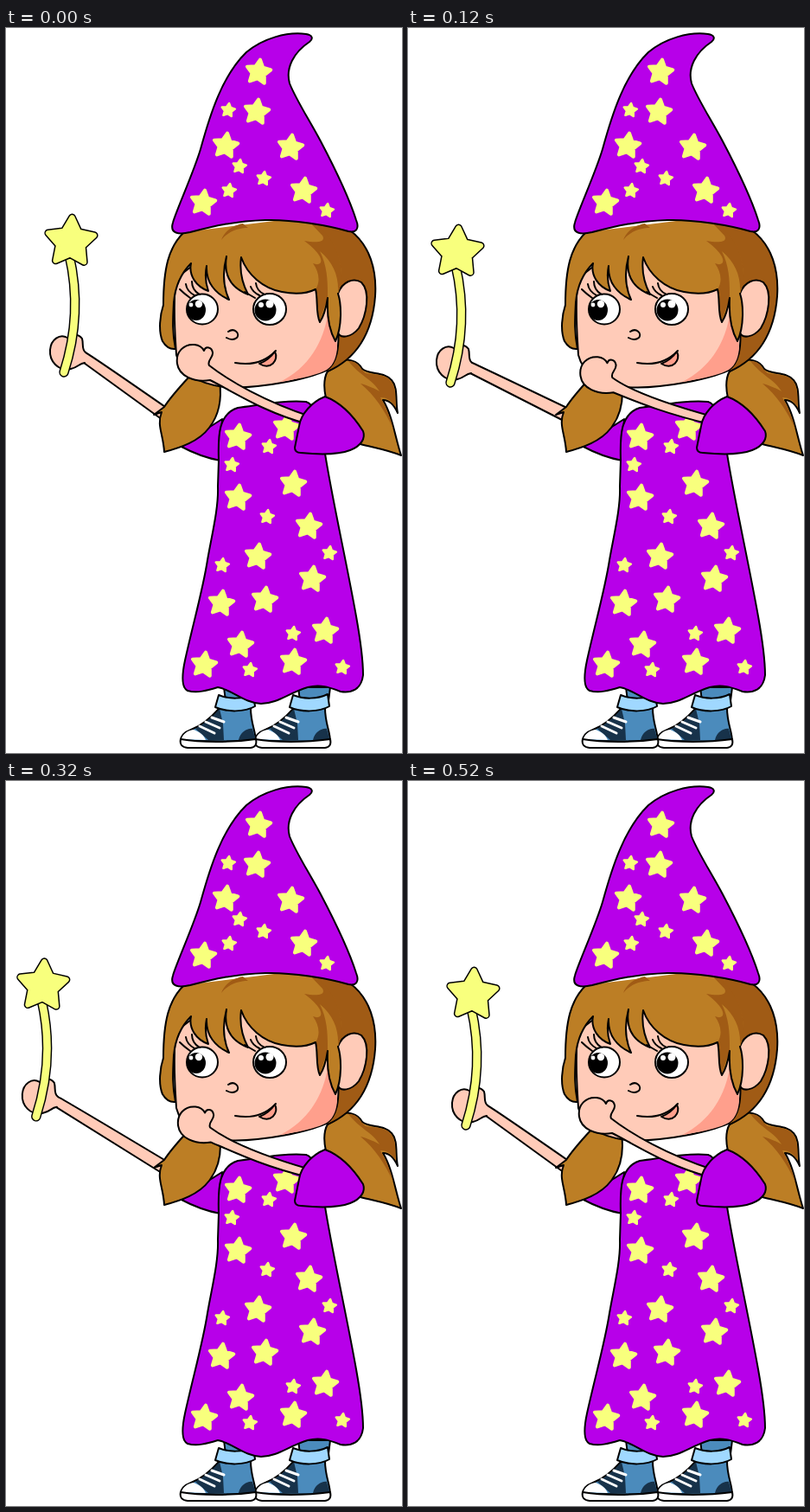
Write an HTML page that moves like this. It is 458x838 px and loops after 0.56 s.

```html
<!DOCTYPE html>
<html lang="en">
<head>
<meta charset="utf-8">
<style>
  html, body { margin: 0; width: 100%; height: 100%; overflow: hidden; background: #fff; }
  svg { display: block; }
  .ink { stroke: #000; stroke-width: 2; stroke-linejoin: round; stroke-linecap: round; }
  .line { fill: none; }
  .purple { fill: #b700e9; }
  .skin { fill: #ffcbb8; }
  .blush { fill: #ff9f8c; }
  .hair { fill: #bc7e25; }
  .shade { fill: #a05b15; }
  .denim { fill: #4b8bbc; }
  .cuff { fill: #a0d8ff; }
  .navy { fill: #17324a; }
  .white { fill: #fff; }
  .yellow { fill: #f8ff7d; stroke: #f8ff7d; stroke-linejoin: round; }
</style>
</head>
<body>
<svg width="458" height="838" viewBox="0 0 458 838">
  <defs>
    <g id="shoe">
      <path class="ink denim" d="M252 762H289L287 778H254Z"/>
      <path class="ink denim" d="M247 786C239 795 228 806 214 811C206 814 202 819 202 824L289 825C289 813 283 804 283 786Z"/>
      <path class="navy" d="M247 787C239 796 231 804 219 810L234 823H252L251 804ZM269 823C271 814 279 809 285 810L289 824Z"/>
      <path class="white" d="M203 822C204 816 210 812 217 811C225 814 229 818 231 823Z"/>
      <path class="line" stroke="#fff" stroke-width="3" stroke-linecap="round" d="M238 797L252 802M231 802L247 809M224 807L241 815"/>
      <path class="ink white" d="M202 822C225 826 260 826 289 822Q291 831 283 832H210Q200 831 202 822Z"/>
      <path class="ink cuff" d="M246 771C258 776 274 776 286 770L288 784C276 791 255 791 242 785Z"/>
    </g>
  </defs>

  <use href="#shoe" x="86"/>
  <use href="#shoe"/>

  <path class="ink purple" d="M250 452L201 483C216 491 230 497 248 500Z"/>
  <path id="farArm" class="ink skin"/>
  <g id="wand">
    <path class="ink skin" d="M91 387C84 388 84 392 75 394C60 397 50 385 51 372C52 360 62 353 71 358C76 354 84 353 88 359C90 366 87 371 92 375"/>
    <path class="line" stroke="#000" stroke-width="11.5" stroke-linecap="round" stroke-linejoin="round" d="M73 262Q89 330 67 398"/>
    <path class="line" stroke="#f8ff7d" stroke-width="8.6" stroke-linecap="round" d="M73 262Q89 330 67 398"/>
  </g>

  <path class="ink purple" d="M246 500C245 470 246 446 268 439C293 436 320 430 347 432Q354 434 358 446L369 492C378 548 394 618 405 680C410 708 413 730 413 748C411 765 399 769 387 767C374 762 363 758 349 762C328 768 314 781 295 781C275 780 262 765 245 762C232 766 221 769 210 766C202 762 204 745 207 731C216 690 228 648 233 615C238 586 246 555 245 530Z"/>
  <path class="ink hair" d="M211 404C200 416 190 427 183 438L171 447L180 444C174 459 182 470 183 490C202 485 223 478 235 462C246 448 250 430 247 408Z"/>
  <path class="ink hair" d="M370 428C366 410 368 394 383 386C394 381 407 384 412 394C421 401 438 397 446 407C454 416 450 431 453 445C449 436 443 430 436 430C447 448 450 473 457 494C439 487 425 485 410 481Z"/>
  <path class="shade" d="M396 385C408 385 409 394 416 399C429 401 440 400 446 409C452 418 449 429 451 439C446 430 440 427 433 427C440 439 445 452 448 464C439 443 426 424 410 411C418 413 427 417 432 420C424 406 409 402 396 385Z"/>

  <path class="ink shade" d="M350 220L398 234C421 251 429 280 427 310C424 349 408 381 372 397L340 340Z"/>
  <path class="ink skin" d="M196 290C193 330 196 360 197 378C202 398 221 411 252 415C294 418 350 405 370 396C383 388 386 370 384 340L372 270L260 240Z"/>
  <path class="blush" d="M372 330C368 362 350 393 317 409C343 405 363 400 371 395C380 389 383 378 383 366L376 335Z"/>
  <path class="ink skin" d="M384 307C389 293 402 288 411 294C422 305 417 332 408 347C400 357 386 361 383 350Z"/>

  <path class="hair" d="M206 236C188 253 182 278 182 320C178 332 176 350 181 362Q187 372 196 371C192 350 193 337 194 317C196 295 204 282 214 272C211 286 220 299 234 304Q229 290 232 275C231 294 242 307 258 314C252 301 250 283 255 264C251 288 262 301 280 308C273 295 270 280 272 265C279 285 297 301 319 305C334 308 348 307 358 302C361 314 358 330 363 340Q369 331 372 312C371 331 374 350 381 362C389 345 388 319 384 307C390 291 391 263 369 240L350 218Z"/>
  <path class="shade" d="M347 220C369 231 390 255 388 293L384 306C385 288 379 271 363 258C373 278 372 299 372 312L363 338C359 328 361 315 358 302C364 293 362 282 355 272C367 277 371 265 345 246C361 249 370 247 366 240ZM249 245C257 235 269 231 280 231L274 226C263 228 253 234 249 245Z"/>
  <path class="ink line" d="M206 236C188 253 182 278 182 320C178 332 176 350 181 362Q187 372 196 371C192 350 193 337 194 317C196 295 204 282 214 272C211 286 220 299 234 304Q229 290 232 275C231 294 242 307 258 314C252 301 250 283 255 264C251 288 262 301 280 308C273 295 270 280 272 265C279 285 297 301 319 305C334 308 348 307 358 302C361 314 358 330 363 340Q369 331 372 312C371 331 374 350 381 362C389 345 388 319 384 307"/>

  <g class="ink white">
    <ellipse cx="227" cy="325" rx="18" ry="17.5"/>
    <ellipse cx="305" cy="325" rx="19" ry="18"/>
  </g>
  <ellipse cx="220" cy="326" rx="11" ry="12"/>
  <circle cx="300" cy="326" r="12.5"/>
  <g class="white">
    <circle cx="223" cy="319" r="4.2"/><circle cx="214" cy="320" r="2.4"/>
    <circle cx="305" cy="319" r="4.5"/><circle cx="295" cy="320" r="3"/>
  </g>
  <path class="ink line" stroke-width="1.5" d="M224 308Q215 303 215 293M218 309Q209 304 208 296M213 312Q206 307 201 302M299 308Q290 304 289 295M293 309Q285 305 283 299M288 312Q281 308 276 305"/>
  <path class="ink line" d="M257 351C264 346 271 353 267 358Q262 362 255 358"/>
  <path class="ink blush" d="M293 388C306 396 316 384 311 374Q304 384 293 388Z"/>
  <path class="ink line" d="M265 387C282 390 299 387 312 373"/>

  <path class="ink purple" d="M193 225C196 213 217 167 225 140C236 100 250 55 278 28C297 12 325 4 347 7C354 8 356 12 351 16C333 28 323 46 328 64C335 82 350 105 364 131C384 169 398 200 405 222C409 232 405 237 396 235C372 228 330 221 300 222C265 223 240 229 213 236C200 239 189 238 193 225Z"/>
  <g id="stars"></g>

  <path id="nearArm" class="ink skin"/>
  <path class="ink purple" d="M369 426C354 432 341 446 339 460L334 485Q334 491 341 491C361 493 385 493 398 488C411 483 416 474 413 466C401 447 385 432 369 426Z"/>
</svg>
<script>
const byId = id => document.getElementById(id);

function starPoints(radius) {
  return Array.from({ length: 10 }, (_, i) => {
    const r = i % 2 ? radius * 0.52 : radius, a = (i / 5 - 0.5) * Math.PI;
    return `${(r * Math.cos(a)).toFixed(2)},${(r * Math.sin(a)).toFixed(2)}`;
  }).join(" ");
}

const star = (x, y, radius, tilt, attrs) =>
  `<polygon points="${starPoints(radius)}" transform="translate(${x} ${y}) rotate(${tilt})" ${attrs}/>`;

const bigStars = [[292, 51], [290, 97], [254, 136], [329, 138], [344, 188], [228, 202],
  [268, 473], [324, 462], [332, 527], [268, 543], [350, 576], [291, 611], [354, 637],
  [249, 665], [299, 661], [369, 697], [271, 713], [229, 736], [332, 733]];
const smallStars = [[257, 95], [270, 160], [298, 174], [258, 188], [371, 211], [304, 484],
  [261, 505], [302, 565], [374, 607], [250, 621], [332, 700], [282, 742], [389, 739]];

byId("stars").innerHTML =
  bigStars.map(([x, y]) => star(x, y, 14.5, 8, 'class="yellow" stroke-width="4"')).join("") +
  smallStars.map(([x, y]) => star(x, y, 8, 8, 'class="yellow" stroke-width="2.5"')).join("");

byId("wand").innerHTML +=
  star(75, 247, 28, 3, 'stroke="#000" stroke-width="9" stroke-linejoin="round"') +
  star(75, 247, 28, 3, 'class="yellow" stroke-width="6"');

// Keys are [time, dx, dy], joined by straight moves.
const wandKeys = [[0, 0, 0], [160, -24, 16], [280, -40, -7], [400, -16.5, -16.5], [520, 0, 0], [560, 0, 0]];
const handKeys = [[0, 0, 0], [160, 2, 19], [520, 0, 0], [560, 0, 0]];

function offsetAt(keys, t) {
  const i = keys.findIndex(key => key[0] > t);
  const [t0, x0, y0] = keys[i - 1], [t1, x1, y1] = keys[i];
  const k = (t - t0) / (t1 - t0);
  return [x0 + (x1 - x0) * k, y0 + (y1 - y0) * k];
}

function draw(now) {
  const t = Math.floor(now % 560 / 40) * 40;

  const [wx, wy] = offsetAt(wandKeys, t);
  byId("wand").setAttribute("transform", `translate(${wx} ${wy})`);
  byId("farArm").setAttribute("d",
    `M${90 + wx} ${374 + wy}Q${95 + wx} ${376 + wy} 190 442L188 458L${90 + wx} ${387 + wy}`);

  const [hx, hy] = offsetAt(handKeys, t);
  const p = (x, y, k = 1) => `${x + hx * k} ${y + hy * k} `;
  byId("nearArm").setAttribute("d",
    `M350 458C${p(300, 445, 0.1)}${p(266, 422, 0.8)}${p(236, 407)}` +
    `C${p(217, 410)}${p(200, 402)}${p(198, 388)}C${p(196, 374)}${p(206, 365)}${p(218, 366)}` +
    `Q${p(226, 367)}${p(229, 373)}C${p(231, 367)}${p(238, 369)}${p(239, 375)}` +
    `C${p(240, 381)}${p(232, 384)}${p(235, 390)}` +
    `C${p(258, 408, 0.9)}${p(300, 432, 0.2)}352 449`);

  requestAnimationFrame(draw);
}
requestAnimationFrame(draw);
</script>
</body>
</html>
```
